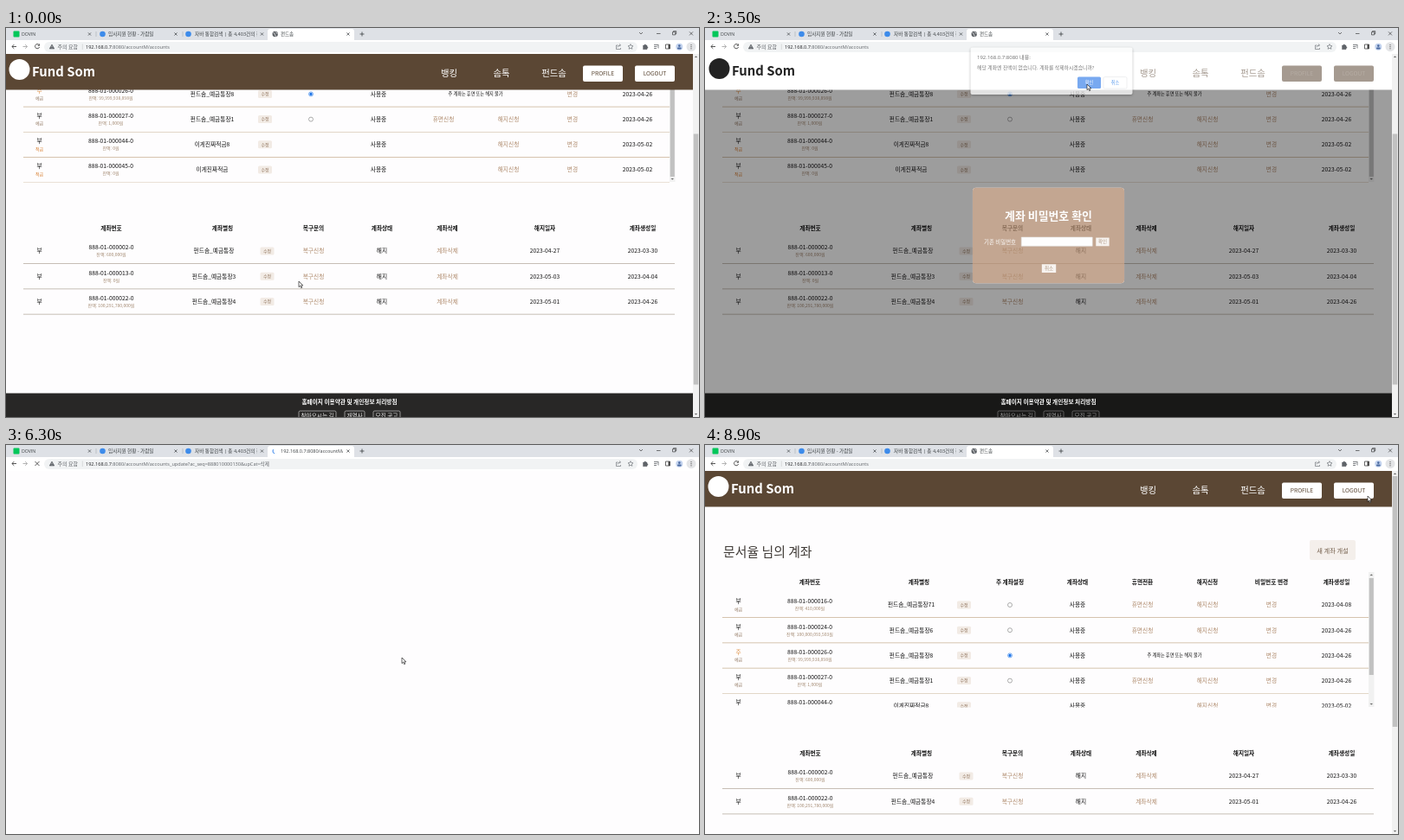
Animation of 800x450 px, one loop 9 s. Source, as an HTML page with a canvas:

```html
<!DOCTYPE html>
<html lang="ko">
<head>
<meta charset="utf-8">
<title>펀드솜</title>
<style>
html, body { margin: 0; width: 100%; height: 100%; overflow: hidden; background: #fff; }
canvas { display: block; width: 800px; height: 450px; }
</style>
</head>
<body>
<canvas id="stage"></canvas>
<script>
const LOOP = 9000;
const dpr = window.devicePixelRatio || 1;

function prepare(canvas) {
  canvas.width = 800 * dpr;
  canvas.height = 450 * dpr;
  const context = canvas.getContext('2d');
  context.scale(dpr, dpr);
  return context;
}

const stage = prepare(document.getElementById('stage'));
const layer = prepare(document.createElement('canvas'));
let ctx = stage;

const SANS = '"Noto Sans CJK KR", "Noto Sans CJK", sans-serif';
const UI = '"Open Sans", "Noto Sans CJK KR", "Noto Sans CJK", sans-serif';
const BROWN = [91, 71, 52], WHITE = [255, 255, 255];
const INK = '#111', LINK = '#ae896a', GREY = '#5f6368', BLUE = '#1a73e8';
const BRAND = '펀드솜';
const HOST = '192.168.0.7';

// status, kind, number, balance, alias, created
const accounts = [
  ['부', '예금', '16', '410,000', BRAND + '_예금통장71', '04-08'],
  ['부', '예금', '24', '100,000,093,503', BRAND + '_예금통장6', '04-26'],
  ['주', '예금', '26', '99,999,938,898', BRAND + '_예금통장8', '04-26'],
  ['부', '예금', '27', '1,000', BRAND + '_예금통장1', '04-26'],
  ['부', '적금', '44', '0', '이게진짜적금8', '05-02'],
  ['부', '적금', '45', '0', '이게진짜적금', '05-02']
];
// number, balance, alias, closed, created
const closedAccounts = [
  ['02', '600,000', '', '04-27', '03-30'],
  ['13', '0', '3', '05-03', '04-04'],
  ['22', '100,291,780,000', '4', '05-01', '04-26']
];
// time, x, y of the pointer tip
const pointerPath = [
  [0, 338, 293], [100, 338, 293], [800, 512, 290], [2500, 512, 290], [3000, 441, 65],
  [3560, 441, 65], [3800, 396, 215], [4200, 420, 247], [5700, 420, 247], [5930, 457, 246],
  [6800, 457, 246], [7400, 474, 66], [8200, 474, 66], [8480, 620, 150], [8880, 765, 59], [LOOP, 765, 59]
];
// spans in which the page header is hovered
const hoverSpans = [[3350, 3700], [7800, 8300]];

const clamp = p => Math.min(1, Math.max(0, p));
const ramp = (t, start, length) => clamp((t - start) / length);
const ease = p => 1 - (1 - clamp(p)) ** 2.2;
const mix = (a, b, p) => `rgb(${a.map((v, i) => Math.round(v + (b[i] - v) * p))})`;

function text(str, x, y, size, color = INK, { weight = 400, align = 'center', font = SANS } = {}) {
  ctx.font = `${weight} ${size}px ${font}`;
  ctx.textAlign = align;
  ctx.fillStyle = color;
  ctx.fillText(str, x, y + size * 0.37);
}

const uiText = (str, x, y, size, color, align = 'left') => text(str, x, y, size, color, { align, font: UI });

function box(x, y, w, h, fill, radius = 0, stroke) {
  ctx.beginPath();
  ctx.roundRect(x, y, w, h, radius);
  if (fill) { ctx.fillStyle = fill; ctx.fill(); }
  if (stroke) { ctx.strokeStyle = stroke; ctx.lineWidth = 0.6; ctx.stroke(); }
}

function disc(x, y, r, fill, stroke) {
  box(x - r, y - r, 2 * r, 2 * r, fill, r, stroke);
}

function path(d, color, width = 0.8, fill) {
  const shape = new Path2D(d);
  if (fill) { ctx.fillStyle = fill; ctx.fill(shape); }
  ctx.strokeStyle = color;
  ctx.lineWidth = width;
  ctx.stroke(shape);
}

function clipped(x, y, w, h, draw) {
  ctx.save();
  ctx.beginPath();
  ctx.rect(x, y, w, h);
  ctx.clip();
  draw();
  ctx.restore();
}

// Draws a group on its own layer, so that it fades as one.
function faded(alpha, draw) {
  if (alpha <= 0) return;
  layer.clearRect(0, 0, 800, 450);
  ctx = layer;
  ctx.save();
  draw();
  ctx.restore();
  ctx = stage;
  ctx.globalAlpha = alpha;
  ctx.drawImage(layer.canvas, 0, 0, 800, 450);
  ctx.globalAlpha = 1;
}

function scrollbar(x, top, bottom, width, thumbTop, thumbHeight) {
  box(x, top, width, bottom - top, '#f1f1f1');
  box(x + 0.7, thumbTop, width - 1.4, thumbHeight, '#c1c1c1');
  const mid = x + width / 2;
  path(`M${mid - 1.5} ${top + 4}h3l-1.5 -1.6z`, '#666', 0.2, '#666');
  path(`M${mid - 1.5} ${bottom - 4}h3l-1.5 1.6z`, '#666', 0.2, '#666');
}

function browserBar(t, loading, updating) {
  box(0, 0, 800, 14, '#dee1e6');
  box(302, 1, 100, 14, '#fff', [3, 3, 0, 0]);
  box(0, 14, 800, 16, '#fff');
  box(44, 16, 685, 12, '#f1f3f4', 6);

  box(8.5, 3.5, 7, 7, '#03c75a', 1);
  for (const x of [111.5, 210.5]) disc(x, 7, 3.3, '#3d8bea');
  uiText('DOVIN', 18, 7, 5.2, '#3c4043');
  uiText('입사지원 현황 - 가람일', 118, 7, 5.6, '#3c4043');
  clipped(218, 0, 72, 14, () => uiText('자바 통합검색 | 총 4,403건의 검색', 218, 7, 5.6, '#3c4043'));
  clipped(316, 0, 73, 14, () =>
    uiText(updating ? HOST + ':8080/accountM/accounts_update' : BRAND, 317, 7, 5.5, '#3c4043'));
  path('M104 4v6M204 4v6', '#9aa0a6', 0.5);
  for (const x of [96.5, 196, 295.5, 395]) path(`M${x - 1.6} 5.4l3.2 3.2m0 -3.2l-3.2 3.2`, '#3c4043', 0.7);

  if (loading) {
    const waiting = t < 6300;
    const turn = t / 1000 * Math.PI * 2 * (waiting ? -0.6 : 1);
    ctx.beginPath();
    ctx.arc(311, 7, 3, turn, turn + 2);
    ctx.strokeStyle = waiting ? '#c4c7cb' : BLUE;
    ctx.lineWidth = 0.9;
    ctx.stroke();
    path('M33.5 19l5 5m0 -5l-5 5', '#444', 0.9);
  } else {
    disc(310.7, 7, 3.2, GREY);
    path('M308.5 5.5q2 .3 1.8 1.8t1.8 2.2M311.5 4.5q0 1.5 2 1.8', '#fff', 0.7);
    path('M38 19.4a2.6 2.6 0 1 0 .6 2.6M38.6 18.4v1.9h-1.9', '#444', 0.9);
  }

  path('M408.5 7h5M411 4.5v5', '#3c4043', 0.8);
  path('M731 5l2 2l2 -2M751 6.5h4.5M769.5 4.7h3.2v3.2h-3.2zM770.5 4.6v-1h3.2v3.2h-1M789 4.4l4 4m0 -4l-4 4', '#222', 0.6);
  path('M12 21.5h-5m2.3 -2.4l-2.4 2.4l2.4 2.4', '#444', 0.9);
  path('M19.5 21.5h5m-2.3 -2.4l2.4 2.4l-2.4 2.4', '#aaa', 0.9);
  path('M53 19l2.8 5h-5.6z', GREY, 0.6, GREY);
  path('M53 20.7v1.6m0 .6v.6', '#fff', 0.6);
  uiText('주의 요함', 59.5, 21.7, 6, GREY);
  path('M88.3 18.5v6.5', '#c6c8cb', 0.6);
  uiText(HOST, 92, 21.5, 5.57, '#202124');
  uiText(':8080/accountM/accounts' + (updating ? '_update?ac_seq=888010000130&upCat=삭제' : ''),
    92 + ctx.measureText(HOST).width, 21.5, 5.57, GREY);

  path('M706.5 20h-2v4.5h5v-1.5M706 22.5q.4 -2.6 3.2 -2.6m-1.2 -1.4l1.6 1.4l-1.6 1.4', GREY, 0.6);
  path('M721 18.6l.9 2l2.1 .2l-1.6 1.4l.5 2.1l-1.9 -1.1l-1.9 1.1l.5 -2.1l-1.6 -1.4l2.1 -.2z', GREY, 0.6);
  path('M735.5 20h1.3a1 1 0 0 1 2 0h1.2v1.6a1 1 0 0 1 0 2v1.2h-4.5z', GREY, 0.4, GREY);
  path('M748 19.5h5.5M748 21.5h3.5M748 23.5h3M753 20v3.5', GREY, 0.8);
  path('M761.5 19h5v5h-5z', '#444', 0.8);
  box(764.5, 19, 2, 5, '#444');
  disc(777.3, 21.7, 4, '#c3d3ee');
  disc(777.3, 20.6, 1.3, '#48689e');
  box(775, 22.4, 4.6, 2, '#48689e', 1);
  disc(791, 21.7, 5.5, '#e4e5e7');
  for (const y of [19.6, 21.7, 23.8]) disc(791, y, 0.6, '#444');
}

function heads(y, columns) {
  for (const [label, x] of columns) text(label, x, y, 6.67, INK, { weight: 700 });
}

function numberCell(number, balance, x, y) {
  text(`888-01-0000${number}-0`, x, y - 4, 6.75, INK, { weight: 500 });
  text(`잔액: ${balance}원`, x, y + 4.5, 5, '#a48a72');
}

function editButton(x, y) {
  box(x - 8, y - 4.5, 16, 9, '#f2ebe5', 1.5);
  text('수정', x, y, 5, '#927660');
}

const cell = (str, x, y, color = INK) => text(str, x, y, 6.7, color, { weight: color === INK ? 500 : 400 });

function accountRow([status, kind, number, balance, alias, created], y) {
  const main = status === '주', deposit = kind === '예금';
  cell(status, 38.5, y - 4, main ? '#dc8a3c' : INK);
  text(kind, 38.5, y + 5, 5, deposit ? '#957c66' : '#d98235');
  numberCell(number, balance, 121, y);
  cell(alias, 238, y);
  editButton(299, y);
  if (deposit) {
    disc(352, y, 2.5, '#fff', main ? BLUE : '#767676');
    if (main) disc(352, y, 1.6, BLUE);
  }
  cell('사용중', 430, y);
  if (main) text('주 계좌는 휴면 또는 해지 불가', 542, y, 5.2, INK, { weight: 500 });
  else {
    if (deposit) cell('휴면신청', 505, y, LINK);
    cell('해지신청', 580, y, LINK);
  }
  cell('변경', 654, y, LINK);
  cell('2023-' + created, 729, y);
  box(20, y + 14.3, 746, 0.7, '#c8b193');
}

function closedRow([number, balance, suffix, closed, created], y, hovered) {
  cell('부', 38.5, y);
  numberCell(number, balance, 121.5, y);
  cell(BRAND + '_예금통장' + suffix, 240, y);
  editButton(301.5, y);
  cell('복구신청', 355, y, LINK);
  cell('해지', 434, y);
  cell('계좌삭제', 509.5, y, hovered ? INK : LINK);
  cell('2023-' + closed, 622, y);
  cell('2023-' + created, 735, y);
  box(20, y + 14.3, 752, 0.7, '#b3a99d');
}

function pageBody(t, fresh) {
  const scroll = fresh ? 0 : 125, inner = fresh ? 0 : 42;
  ctx.save();
  ctx.translate(0, -scroll);
  text('문서율 님의 계좌', 21, 123, 14.9, '#3f3a36', { weight: 300, align: 'left' });
  box(698, 110, 53, 23, '#f4efeb', 2);
  text('새 계좌 개설', 724.5, 122, 7.2, '#75604d', { weight: 500 });

  clipped(0, 147, 766, 156.5, () => {
    heads(159 - inner, [['계좌번호', 121], ['계좌별칭', 247], ['주 계좌설정', 352], ['계좌상태', 430],
      ['휴면전환', 505], ['해지신청', 580], ['비밀번호 변경', 654], ['계좌생성일', 729]]);
    accounts.forEach((row, i) => accountRow(row, 185 + i * 29.2 - inner));
  });
  scrollbar(766, 147, 303, 6.5, fresh ? 154 : 185, 112);

  heads(357, [['계좌번호', 121.5], ['계좌별칭', 250], ['복구문의', 355], ['계좌상태', 434],
    ['계좌삭제', 509.5], ['해지일자', 622], ['계좌생성일', 735]]);
  closedAccounts.filter(row => !fresh || row[0] !== '13').forEach((row, i) =>
    closedRow(row, 383 + i * 29.2, row[0] === '13' && t > 750 && t < 2540));

  box(0, 547.5, 793, 100, '#282726');
  for (const [label, x, w] of [['찾아오시는 길', 338, 43], ['개역사', 391, 23], ['모집 공고', 424, 31]]) {
    box(x, 568, w, 11, null, 1.5, '#ddd');
    text(label, x + w / 2, 573.2, 6.67, '#eee');
  }
  ctx.restore();
}

function headerMix(t) {
  const span = hoverSpans.find(([a, b]) => t >= a && t < b + 500);
  if (!span) return 0;
  const [a, b] = span;
  return ease((Math.min(t, b) - a) / 500) * (1 - ease((t - b) / 500));
}

function pageHeader(t) {
  const hovered = hoverSpans.some(([a, b]) => t >= a && t < b);
  const p = headerMix(t), shift = hovered ? 1 : 0;
  const brandColor = hovered ? '#222' : '#fff';
  const front = mix(WHITE, BROWN, p), back = mix(BROWN, WHITE, p);
  box(0, 30, 793, 41.5, mix(BROWN, WHITE, shift));
  disc(15.5 + shift, 48 - shift, 12, brandColor);
  text('Fund Som', 30 + shift, 51 - shift, 14.8, brandColor, { weight: 700, align: 'left' });
  for (const [label, x] of [['뱅킹', 511.5], ['솜톡', 572], [BRAND, 632.5]])
    text(label, x, 52, 10.4, front, { weight: 500 });
  for (const [label, x] of [['PROFILE', 689], ['LOGOUT', 749]]) {
    box(x - 23, 43.5, 46, 18.5, front, 2);
    text(label, x, 53, 6.67, back);
  }
}

function passwordModal(t) {
  const p = ease(ramp(t, 3300, 420));
  const scale = 1 + 0.1 * (1 - p);
  faded(p, () => {
    ctx.translate(396.5, 240);
    ctx.scale(scale, scale);
    ctx.translate(-396.5, -240);

    // the shade surrounds the panel but does not lie under it
    ctx.beginPath();
    ctx.rect(0, 0, 800, 450);
    ctx.roundRect(311, 186, 171, 108, 4);
    ctx.fillStyle = 'rgba(0, 0, 0, 0.5)';
    ctx.fill('evenodd');
    box(311, 186, 171, 108, '#b18c70', 4);
    text('계좌 비밀번호 확인', 396.5, 218, 12.6, '#fff', { weight: 700 });
    text('기존 비밀번호', 341.8, 247, 6.3, '#fff', { weight: 500 });

    const focused = t > 4300;
    box(366, 242, 80, 10, '#fff', 0, focused ? '#333' : '#ddd');
    const typed = [4700, 4900, 5100, 5300].filter(time => t >= time).length;
    for (let i = 0; i < typed; i++) disc(368 + i * 2, 247.2, 0.8, INK);
    if (focused && t < 5600) box(367.3 + typed * 2, 243.5, 0.5, 7, INK);
    if (typed === 4) text('확인가능', 396.5, 260.5, 6.4, '#d5dce6');

    box(450, 242.5, 15, 9.5, '#f6f1ec');
    text('확인', 457.5, 247, 5.4, t > 5900 ? '#443322' : '#977a60');
    box(389, 272.5, 16, 9.5, '#f6f1ec');
    text('취소', 397, 277, 5.4, '#977a60');
  });
}

function dialog(alpha, message, confirm) {
  faded(alpha, () => {
    if (confirm) ctx.translate(0, -1.4);
    ctx.shadowColor = 'rgba(0, 0, 0, 0.4)';
    ctx.shadowBlur = 3 * dpr;
    ctx.shadowOffsetY = dpr;
    box(306.5, 24, 187, 54.5, '#fff', 2);
    ctx.shadowColor = 'transparent';
    uiText(HOST + ':8080 내용:', 314, 35.3, 6, '#333');
    uiText(message, 314, 47, 5.85, '#444');
    const okX = confirm ? 430 : 460;
    box(okX, 58, 27, 13.5, '#4287ea', 1.5);
    uiText('확인', okX + 13.5, 64.7, 5.2, '#fff', 'center');
    if (confirm) {
      box(460, 58, 27, 13.5, null, 1.5, '#dadce0');
      uiText('취소', 473.5, 64.7, 5.2, BLUE, 'center');
    }
  });
}

function pointer(t) {
  const i = pointerPath.findIndex(point => point[0] > t);
  const [t0, x0, y0] = pointerPath[i - 1], [t1, x1, y1] = pointerPath[i];
  const u = (t - t0) / (t1 - t0), p = u * u * (3 - 2 * u);
  ctx.save();
  ctx.translate(x0 + (x1 - x0) * p, y0 + (y1 - y0) * p);
  const hand = (t > 750 && t < 2540) || (t > 5880 && t < 6300);
  if (hand) path('M-.8 .6q.8 -1 1.6 0v3.2l3 .7q1 .4 .8 1.5l-.7 3.6h-4.4l-2.6 -3.3q-.3 -1.4 1 -.8l1.3 1z', '#000', 0.6, '#fff');
  else if (t > 4150 && t < 5730) path('M-1.4 -3.5h2.8M0 -3.5v7M-1.4 3.5h2.8', '#222', 0.6);
  else path('M0 0v6.6l1.6 -1.4l1.1 2.5l1.1 -.5l-1.1 -2.4h2.1z', '#000', 0.6, '#fff');
  ctx.restore();
}

function draw(t) {
  const updating = t >= 5950 && t < 7800;
  const blank = t >= 6300 && t < 7800;
  const fresh = t >= 7800;
  box(0, 0, 800, 450, '#fefdfe');
  if (!blank) {
    pageBody(t, fresh);
    if (!fresh) {
      passwordModal(t);
      text('홈페이지 이용약관 및 개인정보 처리방침', 396.5, 433, 6.67, '#fff', { weight: 700 });
    }
    pageHeader(t);
    scrollbar(793, 30, 450, 7, fresh ? 36 : 122.5, 290);
  }
  browserBar(t, t >= 5950 && t < 8000, updating);
  dialog(ramp(t, 2050, 200) - ramp(t, 3420, 280), '해당 계좌엔 잔액이 없습니다. 계좌를 삭제하시겠습니까?', true);
  dialog(ramp(t, 6500, 200) - ramp(t, 7750, 150), '계좌 삭제가 완료되었습니다', false);
  pointer(t);
}

function tick() {
  draw(performance.now() % LOOP);
  requestAnimationFrame(tick);
}
tick();
</script>
</body>
</html>
```
